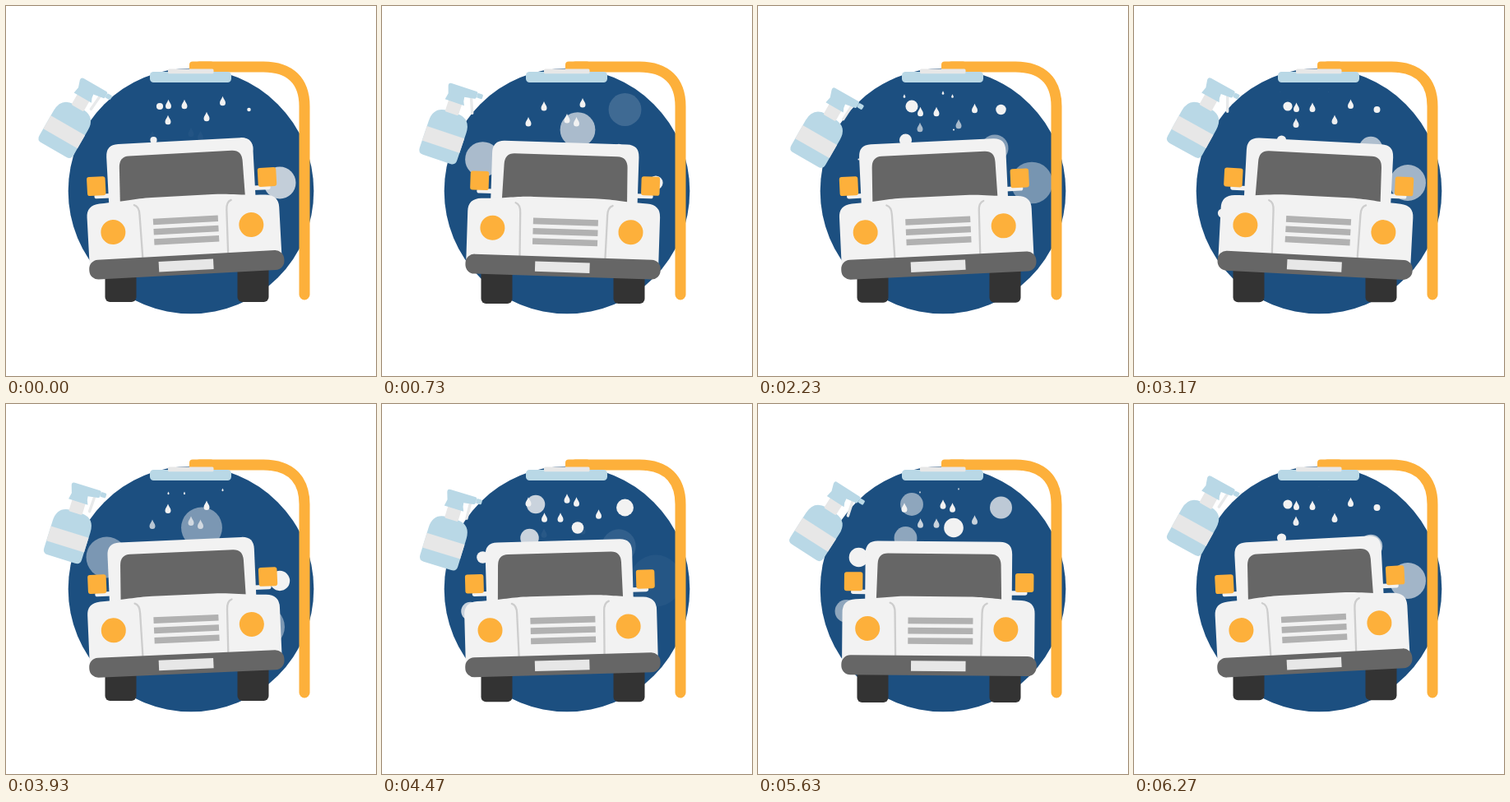
Recreate the animation shown at these times as an HTML page. Size 450x450 px, loop 6.31 s.

```html
<!DOCTYPE html>
<html lang="en">
<head>
<meta charset="utf-8">
<title>Car wash</title>
<style>
  html, body { margin: 0; width: 100%; height: 100%; overflow: hidden; background: #fff; }
  svg { display: block; width: 100vw; height: 100vh; }
  .pale { fill: #f2f2f2; }
  .grey { fill: #666; }
  .amber { fill: #fdb03b; }
  .tyre { fill: #333; }
  .aqua { fill: #b9d8e6; }
  .bar { fill: #b1b1b1; }
  .label { fill: #e7e7e7; }
  .arm { stroke: #f2f2f2; stroke-width: 5.5; stroke-linecap: round; }
  .crease { fill: none; stroke: #cdcdcd; stroke-width: 2.3; stroke-linecap: round; }
  .pipe { fill: none; stroke: #fdb03b; stroke-width: 13; stroke-linecap: round; }
  .trigger { stroke: #e7e9ea; stroke-width: 3.4; stroke-linecap: round; }
</style>
</head>
<body>
<svg viewBox="0 0 450 450">
  <defs>
    <path id="drop" class="pale" d="M0 -6C1 -3 3.5 -.5 3.5 2A3.5 3.5 0 1 1 -3.5 2C-3.5 -.5 -1 -3 0 -6Z"/>
    <circle id="bubble" class="pale" r="1"/>
    <rect id="wheel" class="tyre" width="38" height="45" y="315" rx="6"/>
    <rect id="mirror" class="amber" width="22.5" height="23" y="202" rx="3"/>
    <rect id="slat" class="bar" width="79" height="7.6" x="182"/>
    <circle id="lamp" class="amber" cy="270.5" r="15"/>
  </defs>

  <circle cx="225" cy="225" r="149.3" fill="#1c4f80"/>
  <g id="water"></g>

  <g id="car">
    <use href="#wheel" x="120.5"/>
    <use href="#wheel" x="281.5"/>
    <g id="body">
      <path class="arm" d="M115 226H132M306 226H324"/>
      <use href="#mirror" x="104"/>
      <use href="#mirror" x="312"/>
      <path class="pale" d="M129.5 179Q129.5 164 144.5 164H293Q308 164 308 179V245H129.5Z"/>
      <path class="grey" d="M144.500 192Q145 179 157 179H282Q294 179 294.500 192L295.500 240H143Z"/>
      <path class="pale" d="M102 310V251Q102 236 118 235C150 234 160 231 182 231H256C278 231 288 234 320 235Q336 236 336 251V310Z"/>
      <path class="crease" d="M160 239Q166 241 166 251L167 303M278 239Q272 241 272 251L271 303"/>
      <use href="#slat" y="256.7"/>
      <use href="#slat" y="269"/>
      <use href="#slat" y="281.3"/>
      <use href="#lamp" x="132.8"/>
      <use href="#lamp" x="301"/>
      <rect class="grey" x="101.3" y="303" width="237.4" height="24" rx="11"/>
      <rect class="label" x="186" y="309.4" width="66.5" height="12.4"/>
    </g>
  </g>

  <rect class="amber" x="223" y="67.5" width="30" height="13" rx="4"/>
  <path class="pipe" d="M235 74H313C346 74 363 92 363 122V351"/>
  <rect class="aqua" x="175" y="80" width="99" height="13" rx="4.5"/>
  <rect class="label" x="197" y="76.6" width="55.5" height="5.6" rx="1.5"/>

  <g id="bottle">
    <line id="trigger" class="trigger" y2="19"/>
    <path class="aqua" d="M-23 23V-12Q-23 -30 -6 -31H8Q25 -30 25 -12V23Q25 29.5 18.500 29.500H-16.500Q-23 29.500 -23 23Z"/>
    <rect class="label" x="-23" y="-5" width="48" height="18.5"/>
    <rect class="label" x="-8" y="-45" width="17" height="16" rx="1.5"/>
    <path class="aqua" d="M-12.500 -43L-11 -51L-14 -60Q-15 -64 -11 -64H21Q23 -64 23 -62V-57Q23 -55 21 -55L9 -53Q9 -48 12 -43Z"/>
    <rect class="aqua" x="23" y="-63" width="7" height="6" rx="1.5"/>
  </g>
</svg>
<script>
const LOOP = 6310, SPRAY = 1033.3, ROCK = 2 * SPRAY, SWAY = 3 * SPRAY;
const SMALL = 22, MEDIUM = 25, LARGE = 37;
const byId = id => document.getElementById(id);
const clamp = v => Math.max(0, Math.min(1, v));
const turn = (t, period) => 2 * Math.PI * t / period;
const place = (el, transform) => el.setAttribute('transform', transform);
const water = byId('water'), particles = [];

// A particle is born once per spray cycle; pose(age) gives its place, size and opacity.
function spawn(shape, birth, pose) {
  const el = document.createElementNS('http://www.w3.org/2000/svg', 'use');
  el.setAttribute('href', '#' + shape);
  water.append(el);
  particles.push({ el, birth, pose });
}

const bubble = (birth, growth, x, y) => spawn('bubble', birth, age =>
  ({ x, y, size: growth * age, opacity: (.87 - age) / .44 }));

const drop = (birth, x, top) => spawn('drop', birth, age =>
  ({ x, y: top + 57 * age, size: clamp(age * 4), opacity: (.95 - age) / .28 }));

bubble(.13, LARGE, 238, 150.5);
bubble(.13, LARGE, 122.5, 186.5);
bubble(.13, LARGE, 314, 271);
bubble(.475, LARGE, 333, 215);
bubble(.5, MEDIUM, 288, 173);
bubble(.91, MEDIUM, 295.5, 126);
bubble(.815, SMALL, 187, 122);
bubble(.815, SMALL, 179.5, 163);
bubble(.815, SMALL, 107.5, 252);

// Three evenly spaced bursts, neighbours starting at alternate heights
[[178, 225, 236.5], [197, 244], [217, 263.5, 197.5]].forEach((burst, n) =>
  burst.forEach((x, i) => drop(.06 + n / 3, x, 104 - 4 * (i % 2))));

function draw(t) {
  for (const { el, birth, pose } of particles) {
    const { x, y, size, opacity } = pose((t / SPRAY - birth + 1) % 1);
    place(el, `translate(${x} ${y}) scale(${size})`);
    el.setAttribute('opacity', clamp(opacity));
  }

  const lean = Math.cos(turn(t, ROCK));
  place(byId('car'), `translate(0 ${3.2 * (1 - lean * lean)})`);
  place(byId('body'), `rotate(${-3.07 * lean} 217 318)`);

  const c = Math.cos(turn(t, SWAY)), s = Math.sin(turn(t, SWAY));
  place(byId('bottle'),
    `translate(${73.3 - 1.3 * c + 1.7 * s} ${159 - 10 * c}) rotate(${24.5 + 5.5 * c - 6.5 * s})`);
  place(byId('trigger'), `translate(17 -55) rotate(${-12 + 17 * lean})`);
}

function tick() {
  draw(performance.now() % LOOP);
  requestAnimationFrame(tick);
}
tick();
</script>
</body>
</html>
```
